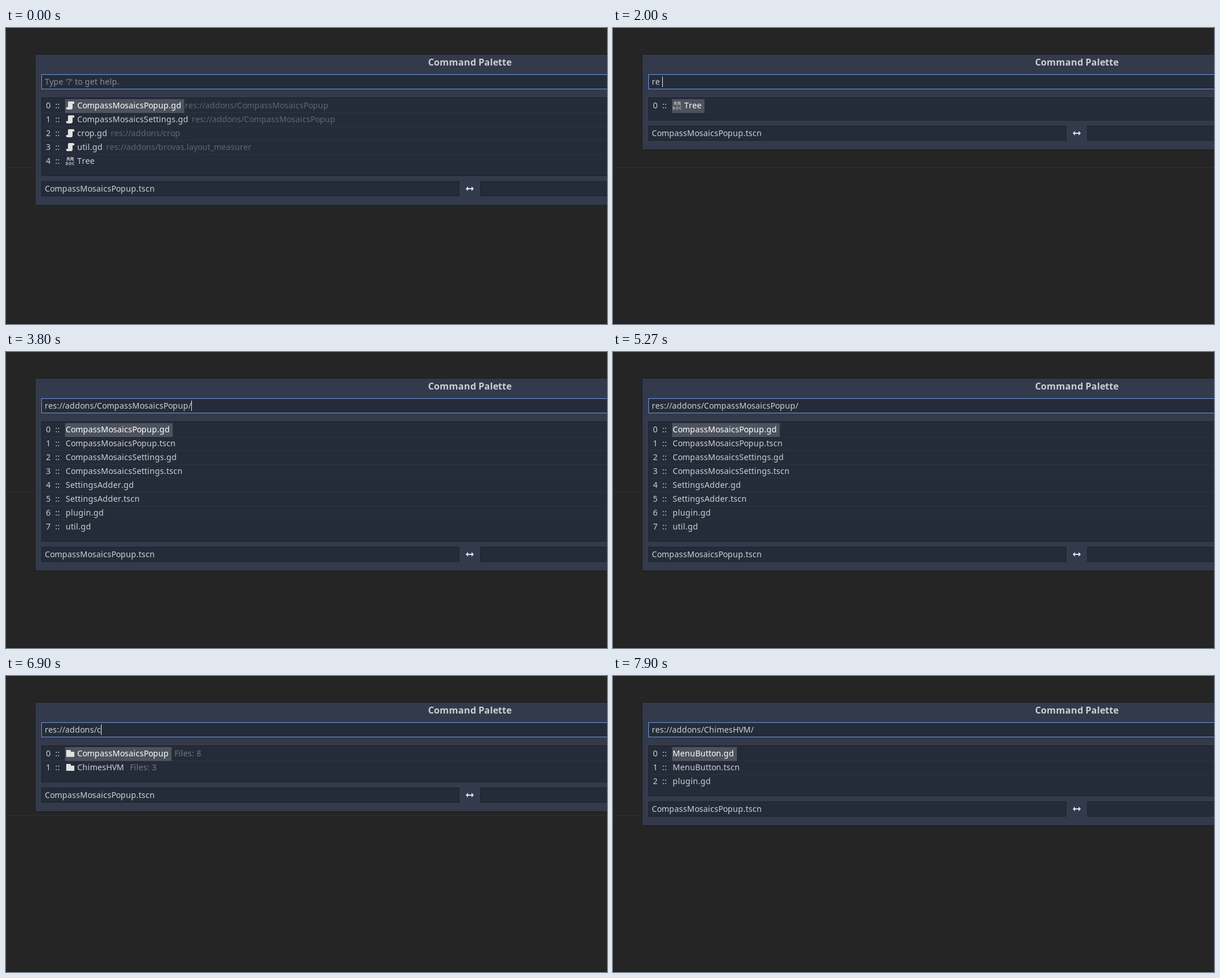
Recreate the animation shown at these times as an HTML page with a canvas. Size 1038 by 512 pixels, loop 8000 ms.

```html
<!DOCTYPE html>
<html lang="en">
<head>
<meta charset="utf-8">
<title>Command Palette</title>
<style>
  html, body { margin: 0; width: 100%; height: 100%; overflow: hidden; background: #252525; }
  canvas { display: block; }
</style>
</head>
<body>
<canvas id="stage" width="1038" height="512"></canvas>
<script>
const W = 1038, H = 512, LOOP = 8000;
const ctx = document.getElementById('stage').getContext('2d');
const REGULAR = '14px "Noto Sans", sans-serif';
const BOLD = 'bold 16px "Noto Sans", sans-serif';
const TEXT = '#cdcfd2', FIELD = '#252c39', EDGE = '#1b202a';

const scroll = new Path2D('M6 1h7q2 0 2 2v2h-3v7q0 3-3 3H3q-2 0-2-2v-2h3V3q0-2 2-2z');
const folder = new Path2D('M2 2a1 1 0 0 0-1 1v10a1 1 0 0 0 1 1h12a1 1 0 0 0 1-1V6a1 1 0 0 0-1-1H9V3a1 1 0 0 0-1-1z');
const book = new Path2D('M2 8V3q0-2 2-2h1q2 0 2 2v5H5.500V6h-2v2zM8 8V3q0-2 2-2h1q3 0 3 2v5h-2.500V6h-2v2z');
const docWord = new Path2D('M1 10.500v4h1.500q1.800-2 0-4zM7 10.500h1.500l1 1v2l-1 1H7l-1-1v-2zM15 10.500h-2l-1 1v2l1 1h2');

// Lists of rows: name, note, icon
const base = 'CompassMosaics', popup = base + 'Popup';
const home = 'res://addons/', extra = 'ChimesHVM', tool = 'brovas.layout_measurer';
const script = (name, dir) => ({ name: name + '.gd', note: home + dir, icon: scroll, dim: '#61666f' });
const dir = (name, note) => ({ name, note: ' ' + note, icon: folder, dim: '#737881' });
const files = names => names.split(' ').map(name => ({ name }));

const tree = [{ name: 'Tree', icon: book }];
const recent = [script(popup, popup), script(base + 'Settings', popup), script('crop', 'crop'), script('util', tool), ...tree];
const root = [dir('addons', 'Subdirs: 5'), dir('scenes', 'Files: 4'), dir('scripts', 'Files: 6')];
const addons = [dir(popup, 'Files: 8'), dir(extra, 'Files: 3'), dir('tile-folder', 'Subdirs: 5 + Files: 1'),
  dir('crop', 'Files: 8'), dir(tool, 'Files: 4')];
const popupFiles = files(`${popup}.gd ${popup}.tscn ${base}Settings.gd ${base}Settings.tscn ` +
  'SettingsAdder.gd SettingsAdder.tscn plugin.gd util.gd');
const extraFiles = files('MenuButton.gd MenuButton.tscn plugin.gd');

// Start time, typed text, rows, times at which the caret toggles, caret hidden at first
const steps = [
  [0, '', recent, [400, 1000], true],
  [1300, 'r', tree, []],
  [1500, 're', tree, []],
  [2000, 're ', tree, []],
  [2030, 'res://', root, []],
  [2500, home, addons, [2870, 3370]],
  [3530, home + ' ', addons, []],
  [3800, home + popup + '/', popupFiles, [4270, 4770, 5270]],
  [5800, home, addons, [6300, 6800]],
  [6900, home + 'c', addons.slice(0, 2), []],
  [7330, home + 'ch', addons.slice(1, 2), []],
  [7500, home + 'ch ', addons.slice(1, 2), []],
  [7900, home + extra + '/', extraFiles, [], true]
];

function rect(x, y, w, h, color) {
  ctx.fillStyle = color;
  ctx.fillRect(x, y, w, h);
}

function box(x, y, w, h, edge) {
  rect(x, y, w, h, edge);
  rect(x + 1, y + 1, w - 2, h - 2, FIELD);
}

// Writes text with whole-pixel advances and returns the end position
function write(str, x, y, color = TEXT, font = REGULAR) {
  ctx.font = font;
  ctx.fillStyle = color;
  for (const ch of str) {
    ctx.fillText(ch, x, y);
    x += Math.round(ctx.measureText(ch).width);
  }
  return x;
}

function drawIcon(icon, x, y) {
  ctx.save();
  ctx.translate(x, y);
  ctx.fillStyle = ctx.strokeStyle = icon === book ? '#95989d' : '#e0e0e0';
  ctx.fill(icon);
  if (icon === book) {
    ctx.lineWidth = 1.5;
    ctx.stroke(docWord);
  }
  ctx.restore();
}

function drawRow(row, i) {
  const y = 123 + 24 * i, x = row.icon ? 123 : 103, baseline = y + 16;
  write(`${i}  ::`, 69, baseline);
  let end = write(row.name, x, baseline);
  if (i === 0) {
    rect(102, y, end + 5 - 102, 24, '#4c535d');
    write(row.name, x, baseline, '#fff');
  }
  if (row.icon) drawIcon(row.icon, 103, y + 3);
  if (row.note) write(row.note, end + 6, baseline, row.dim);
}

function drawArrow(x, y) {
  ctx.fillStyle = '#e0e0e0';
  ctx.fill(new Path2D(`M${x - 7} ${y}l4-4v3h6v-3l4 4-4 4v-3h-6v3z`));
}

function draw(time) {
  const [, typed, rows, blinks, hidden] = steps.findLast(step => step[0] <= time);
  const toggles = blinks.filter(b => b <= time).length;
  const caretOn = (toggles + (hidden ? 0 : 1)) % 2 === 1;
  const listEnd = 136 + 24 * rows.length, fieldY = listEnd + 9, bottom = listEnd + 50;

  rect(0, 0, W, H, '#252525');
  rect(0, 0, W, 1, '#202020');
  rect(0, 510, W, 2, '#202020');
  rect(0, 241, W, 1, '#5e1b2a');

  rect(50, 45, W, bottom - 44, '#1b1c20');
  rect(51, 46, W, bottom - 46, '#333a4b');
  write('Command Palette', 729, 65, TEXT, BOLD);

  box(61, 80, W, 26, '#6b98e0');
  const caret = write(typed, 67, 98);
  if (!typed) write("Type '?' to get help.", 67, 98, '#898c93');
  if (caretOn) rect(caret, 84, 1, 18, '#e8e9eb');

  box(61, 120, W, listEnd - 120, EDGE);
  for (let i = 1; i < rows.length; i++) rect(63, 122 + 24 * i, W, 1, '#2d3441');
  rows.forEach(drawRow);

  box(61, fieldY, 722, 26, EDGE);
  write(popup + '.tscn', 67, fieldY + 18);
  drawArrow(801, fieldY + 13);
  box(819, fieldY, W, 26, EDGE);
}

function tick() {
  draw(performance.now() % LOOP);
  requestAnimationFrame(tick);
}
tick();
</script>
</body>
</html>
```
